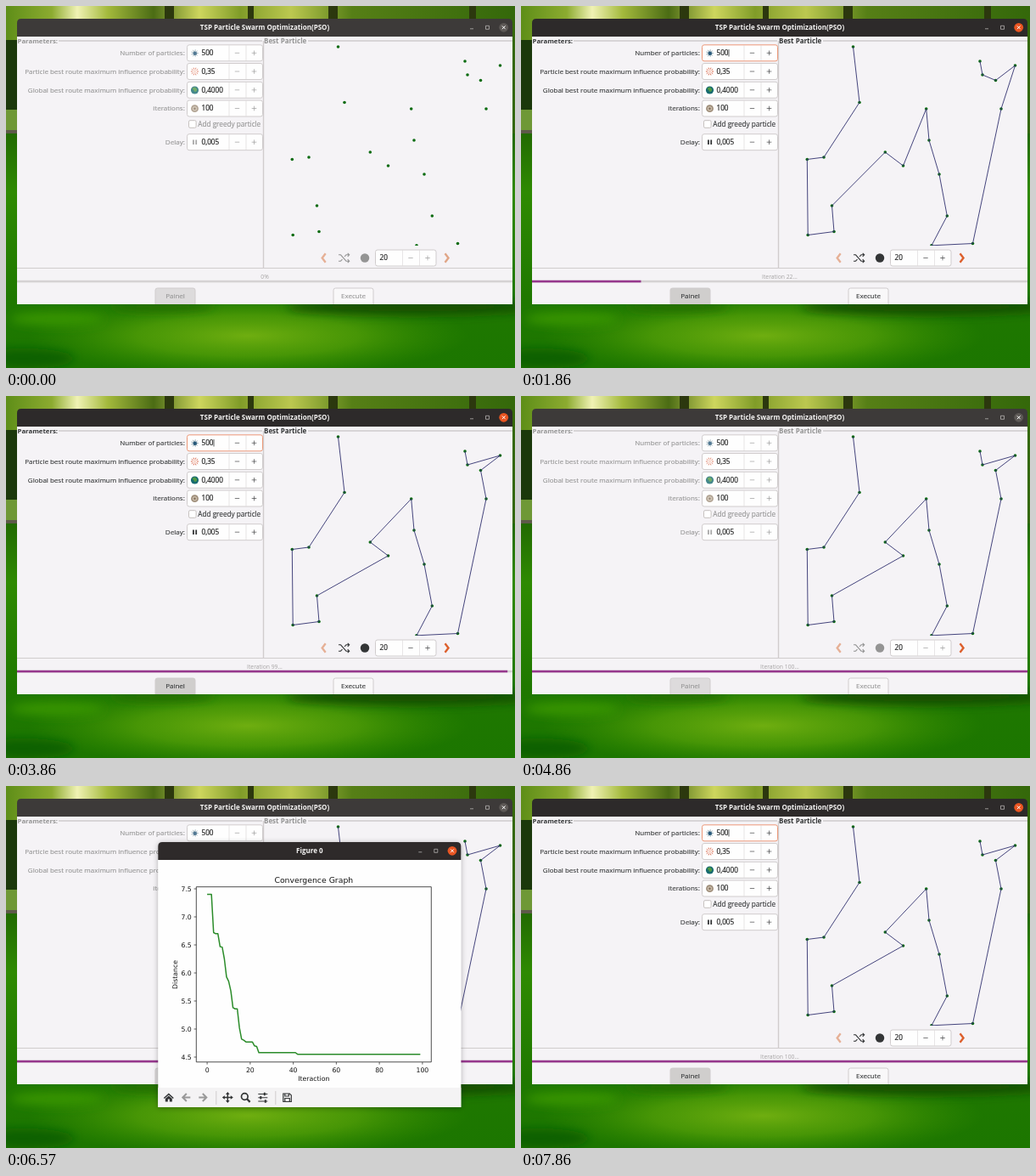
Write an HTML page that moves like this. It is 600x426 px and loops after 8 s.

```html
<!DOCTYPE html>
<html lang="en">
<head>
<meta charset="utf-8">
<title>Particle swarm demo</title>
<style>
  html, body { margin: 0; width: 100%; height: 100%; overflow: hidden; background: #237a00; }
  svg { display: block; width: 100%; height: 100%; }
  text { font: 8px "Open Sans", sans-serif; fill: var(--ink); stroke: var(--ink); stroke-width: .12px; }
  .bold { font-weight: 700; stroke: none; }
  .title { font-weight: 700; fill: #f6f5f4; stroke: none; }
  .value { font-size: 8.2px; fill: #222; stroke: #222; stroke-width: .2px; }
  .status { font-size: 6.8px; fill: #a5a3a3; stroke: none; }
  .plot text { font: 7.75px "DejaVu Sans", sans-serif; fill: #151515; stroke: none; }
  .plot .heading { font-size: 9.3px; }
  .right { text-anchor: end; }
  .mid { text-anchor: middle; }
  .line { fill: none; stroke: var(--ink); }
  .edge { fill: none; stroke: #d0cccd; }
  .window { --ink: #333536; --bar: #2d2a2a; --close: #e95420; --pressed: #d0cecd; --focus: #ec9878; }
  .window.blurred { --ink: #949494; --bar: #3d3a39; --close: #5d5956; --pressed: #dddbdc; --focus: #d0cccd; }
  .blurred .caret { display: none; }
  .blurred .icons { opacity: .8; }
</style>
</head>
<body>
<svg viewBox="0 0 600 426" preserveAspectRatio="none">
  <defs>
    <linearGradient id="treeline">
      <stop offset="0" stop-color="#5e8e18"/><stop offset=".09" stop-color="#8cab30"/>
      <stop offset=".14" stop-color="#f0f2b4"/><stop offset=".2" stop-color="#a3b93c"/>
      <stop offset=".29" stop-color="#4b6c14"/><stop offset=".38" stop-color="#ced65e"/>
      <stop offset=".46" stop-color="#809c28"/><stop offset=".56" stop-color="#bcc850"/>
      <stop offset=".68" stop-color="#567f16"/><stop offset="1" stop-color="#34680a"/>
    </linearGradient>
    <linearGradient id="lawn" x2="0" y2="1">
      <stop offset="0" stop-color="#226a02"/><stop offset=".25" stop-color="#2f8a02"/>
      <stop offset=".7" stop-color="#1f7800"/><stop offset="1" stop-color="#1c7600"/>
    </linearGradient>
    <radialGradient id="sunlight">
      <stop offset="0" stop-color="#6fae10"/><stop offset=".5" stop-color="#55a008" stop-opacity=".75"/>
      <stop offset="1" stop-color="#3a9000" stop-opacity="0"/>
    </radialGradient>
    <filter id="soft" x="-50%" y="-100%" width="200%" height="300%"><feGaussianBlur stdDeviation="6"/></filter>
    <filter id="shadow" x="-10%" y="-10%" width="120%" height="120%">
      <feDropShadow dx="0" dy="1" stdDeviation="3" flood-opacity=".3"/>
    </filter>
    <clipPath id="canvasArea"><path d="M304 42H597V282H304z"/></clipPath>
  </defs>

  <g id="park">
    <path fill="url(#treeline)" d="M0 0H600V150H0z"/>
    <path fill="#2c380e" d="M187 0h11v20h-11zM285 0h7v20h-7zM380 0h11v20h-11zM546 0h8v20h-8z"/>
    <path fill="#1b380b" d="M0 40H14V122H0z"/>
    <path fill="#6f9836" d="M0 122H14V146H0z"/>
    <path fill="#5e5a4a" d="M0 146H14V150H0z"/>
    <path fill="url(#lawn)" d="M0 150H600V426H0z"/>
    <ellipse cx="285" cy="388" rx="260" ry="48" fill="url(#sunlight)"/>
    <g filter="url(#soft)">
      <ellipse cx="480" cy="354" rx="150" ry="9" fill="#124c00"/>
      <ellipse cx="185" cy="353" rx="60" ry="6" fill="#216a00"/>
      <ellipse cx="60" cy="368" rx="55" ry="8" fill="#389400"/>
      <ellipse cx="20" cy="415" rx="60" ry="12" fill="#116000"/>
    </g>
  </g>
  <g id="app" class="window"></g>
  <g id="figure" class="window" filter="url(#shadow)"></g>
</svg>

<script>
const $ = id => document.getElementById(id);
const label = (x, y, s, cls = '', extra = '') => `<text x="${x}" y="${y}" class="${cls}" ${extra}>${s}</text>`;
const path = (d, cls = 'line', extra = '') => `<path d="${d}" class="${cls}" ${extra}/>`;
const box = (x, y, w, h, fill, extra = '') => `<rect x="${x}" y="${y}" width="${w}" height="${h}" fill="${fill}" ${extra}/>`;
const dot = (x, y, r, fill) => `<circle cx="${x}" cy="${y}" r="${r}" fill="${fill}"/>`;
const range = (n, f) => Array.from({ length: n }, (_, i) => f(i));

function titleBar(x, y, w, title) {
  const right = x + w, cy = y + 10.3;
  return path(`M${x} ${y + 21}v-16q0-5 5-5h${w - 10}q5 0 5 5v16z`, '', 'style="fill:var(--bar)"') +
    label(x + w / 2, y + 13.4, title, 'title mid') +
    path(`M${right - 50} ${cy + 1.5}h4M${right - 31.5} ${cy - 2}h4v4h-4z`, '', 'fill="none" stroke="#c8c5c3" stroke-width=".7"') +
    dot(right - 10.3, cy, 5.4, 'var(--close)') +
    path(`M${right - 12.2} ${cy - 1.9}l3.8 3.8m0-3.8l-3.8 3.8`, '', 'stroke="#fff" stroke-width="1"');
}

function spinner(x, y, w, value, textX, border = '#d0cccd') {
  const minus = x + w - 30, plus = x + w - 10;
  return box(x, y - 9.5, w, 19, '#fefefe', `rx="2.5" style="stroke:${border}"`) +
    path(`M${minus - 9.5} ${y - 9}v18M${plus - 9.5} ${y - 9}v18`, 'edge', 'stroke-opacity=".5"') +
    path(`M${minus - 2.7} ${y}h5.4M${plus - 2.8} ${y}h5.6M${plus} ${y - 2.8}v5.6`, 'line', 'stroke-width=".8" stroke-opacity=".8"') +
    label(textX, y + 2.9, value, 'value');
}

const rays = (x, y, n, r1, r2) => range(n, i => {
  const a = i * 2 * Math.PI / n, c = Math.cos(a), s = Math.sin(a);
  return `M${x + c * r1} ${y + s * r1}L${x + c * r2} ${y + s * r2}`;
}).join('');

const icons = [
  path(rays(222.5, 55.5, 9, 1, 4.3), '', 'stroke="#8fa6b0" stroke-width="1"') + dot(222.8, 55.8, 2.2, '#28597a'),
  path(rays(222.5, 77, 10, 2.6, 4.6), '', 'stroke="#d9684c" stroke-width="1"') + dot(222.5, 77, 2, '#f7d8cd'),
  dot(222.5, 99, 4.6, '#176b70') + path('M219.5 97q3-3 5 0t-2 4z', '', 'fill="#4e9a45"'),
  dot(222.5, 120.7, 4.4, '#9d8c78') + dot(222.5, 120.7, 2.8, '#c9bcaa') + dot(222.5, 120.7, 1.2, '#806d59'),
  path('M220.9 157.5v5.4M224.2 157.5v5.4', 'line', 'stroke-width="1.8"')
].join('');

const fields = [
  ['Number of particles:', '500', 55.3],
  ['Particle best route maximum influence probability:', '0,35', 77],
  ['Global best route maximum influence probability:', '0,4000', 98.8],
  ['iterations:', '100', 120.5],
  ['Delay:', '0,005', 160.2]
];

// Cities in the order of the best tour found.
const cities = [[391.5, 48], [399, 113.5], [357, 178], [337.3, 180.5], [338.2, 269.5], [369, 265.5], [366.5, 235],
  [450.5, 188], [429.3, 172], [477.7, 121], [481, 158], [493, 198], [502.3, 247], [484, 281.8], [532.5, 279.5],
  [566, 121], [559.5, 87.5], [582.5, 70], [544, 81], [541, 65]];

// Each entry keeps a stretch of the tour reversed until the given iteration.
const detours = [[42, 16, 18], [24, 7, 9], [15, 10, 15], [12, 3, 6], [10, 5, 12], [8, 9, 17], [6, 1, 9], [3, 4, 14]];

function tourAt(iteration) {
  let tour = cities.slice();
  for (const [until, from, to] of detours) {
    if (iteration < until) tour = [...tour.slice(0, from), ...tour.slice(from, to).reverse(), ...tour.slice(to)];
  }
  return 'M' + tour.join('L');
}

$('app').innerHTML =
  box(13, 30, 584, 321, '#f5f3f6') + titleBar(13, 15, 584, 'TSP Particle Swarm Optimization(PSO)') +
  path('M62 41H302M356 41H597M303.5 41V308', 'edge', 'stroke-width="1.4"') +
  path('M13 308.5H597', 'edge') +
  label(13.5, 43.7, 'Parameters:', 'bold', 'style="font-size:7.8px"') + label(304, 43.7, 'Best Particle', 'bold') +
  fields.map(([name, value, y], i) =>
    label(210.8, y + 2.7, name, 'right') + spinner(213.5, y, 89, value, 230.5, i ? undefined : 'var(--focus)')).join('') +
  `<g class="icons">${icons}</g>` + path('M245 51v8.5', 'line caret', 'stroke-width=".8"') +
  box(215.5, 134.7, 8.6, 8.6, '#fff', 'rx="1.5" stroke="#c6c1bf"') +
  label(226.3, 142, 'Add greedy particle', '', 'style="font-size:8.2px"') +
  `<g clip-path="url(#canvasArea)">${cities.map(([x, y]) => dot(x, y, 1.8, '#0b6b10')).join('')}
    <path id="tour" fill="none" stroke="#30306f" stroke-width=".9"/></g>` +
  path('M376.7 291.3l-4 5.2 4 5.2', '', 'fill="none" stroke="#e6b096" stroke-width="2.4"') +
  path('M517.5 291.3l4 5.2-4 5.2', '', 'id="next" fill="none" stroke-width="2.4"') +
  path('M392 292.8h2.5l6.5 7.4h3.5M392 300.2h2.5l2-2.2M399 295l2-2.2h3.5M402.7 290.8l2 2-2 2M402.7 298.2l2 2-2 2', 'line', 'stroke-width="1.1"') +
  dot(423, 296.5, 5.2, 'var(--ink)') + spinner(435.5, 296.5, 71.5, '20', 440.5) +
  label(305, 321.3, '', 'status mid', 'id="status"') +
  box(13, 322.8, 584, 2.6, '#d5d2d3') + box(13, 322.8, 0, 2.6, '#96378d', 'id="progress"') +
  path('M176 351v-16.5q0-2.5 2.5-2.5h42q2.5 0 2.5 2.5v16.5', 'edge', 'style="fill:var(--pressed)"') +
  path('M386 351v-16.5q0-2.5 2.5-2.5h42q2.5 0 2.5 2.5v16.5', 'edge', 'style="fill:#f9f8f9"') +
  label(199.5, 344, 'Painel', 'mid') + label(409.5, 344, 'Execute', 'mid');

// Convergence chart: iteration and distance at each bend.
const bends = [[0, 7.4], [2, 7.4], [3, 6.72], [4, 6.7], [5, 6.7], [6, 6.47], [7, 6.46], [8, 6.25], [9, 5.93], [10, 5.85],
  [11, 5.68], [12, 5.38], [13, 5.36], [14, 5.36], [15, 5.02], [16, 4.82], [17, 4.8], [18, 4.77], [21, 4.77], [22, 4.7],
  [23, 4.69], [24, 4.58], [41, 4.58], [42, 4.55], [99, 4.55]];
const chartX = i => 57.8 + i * 2.538;
const chartY = d => 55 + (7.5 - d) * 66;
const curve = 'M' + bends.map(([i, d]) => [chartX(i), chartY(d)]).join('L');

const axes = path('M45 52.7H322V258.8H45z', '', 'fill="none" stroke="#222" stroke-width=".8"') +
  range(6, i => {
    const x = chartX(i * 20);
    return path(`M${x} 259v2.7`, '', 'stroke="#222" stroke-width=".7"') + label(x, 270.6, i * 20, 'mid');
  }).join('') +
  range(7, i => {
    const y = chartY(4.5 + i / 2);
    return path(`M45 ${y}h-2.7`, '', 'stroke="#222" stroke-width=".7"') + label(39.5, y + 2.9, (4.5 + i / 2).toFixed(1), 'right');
  }).join('');

const toolbar = box(0, 289, 357, 23, '#f4f3f4') +
  path('M68.5 293v16M138.5 293v16', 'edge') +
  path('M6.5 301l6-5.5 6 5.5-1 1-5-4.5-5 4.5zM8.5 302l4-3.6 4 3.6v3.5h-3v-3h-2v3h-3z', '', 'fill="#303334"') +
  path('M38 300.5h-9m4.5-4.5l-4.5 4.5 4.5 4.5M48 300.5h9m-4.5-4.5l4.5 4.5-4.5 4.5', '', 'fill="none" stroke="#999" stroke-width="2"') +
  path('M77 300.5h10M82 295.5v10', 'line', 'stroke-width="1.5"') +
  path('M82 294l2.3 3h-4.6zM82 307l2.3-3h-4.6zM75.5 300.5l3-2.3v4.6zM88.5 300.5l-3-2.3v4.6z', '', 'fill="#303334"') +
  '<circle cx="102" cy="299.5" r="3.8" class="line" stroke-width="1.7"/>' + path('M104.7 302.3l3.6 3.6', 'line', 'stroke-width="2.2"') +
  path('M118 296.5h11M118 300.7h11M118 305h11', 'line', 'stroke-width="1.1"') +
  path('M125.5 294.8v3.4M121 299v3.4M126.5 303.3v3.4', 'line', 'stroke-width="2"') +
  path('M147.5 296h7.5l2 2v7.5h-9.5zM149.5 296v3h4.5v-3M149.5 305v-3.5h5.5v3.5', 'line', 'stroke-width="1.2"');

$('figure').innerHTML = box(0, 15, 357, 297, '#fefefe') + titleBar(0, 0, 357, 'Figure 0') +
  `<g class="plot">${axes}${path(curve, '', 'fill="none" stroke="#2c8c2a" stroke-width="1.5" stroke-linejoin="round"')}
    ${label(183.5, 48, 'Convergence Graph', 'mid heading')}${label(183.5, 281, 'Iteraction', 'mid')}
    ${label(0, 0, 'Distance', 'mid', 'transform="translate(22.5 156) rotate(-90)"')}</g>` + toolbar;

const clamp = v => Math.max(0, Math.min(1, v));
const smooth = v => v * v * (3 - 2 * v);

function render(time) {
  const tick = Math.floor((time + 5) * 7 / 1000); // seven pictures a second
  const iteration = Math.min(100, Math.max(0, Math.round((tick - 9) * 5.5)));
  const running = iteration > 0;

  $('app').classList.toggle('blurred', tick < 9 || (tick >= 34 && tick < 50));
  $('tour').setAttribute('d', running ? tourAt(iteration) : '');
  $('next').setAttribute('stroke', running ? '#dd602d' : '#e0a687');
  $('status').textContent = running ? `Iteration ${iteration}...` : '0%';
  $('progress').setAttribute('width', 5.84 * iteration);

  const drag = smooth(clamp((tick - 38) / 6));
  $('figure').style.display = tick >= 35 && tick < 50 ? '' : 'none';
  $('figure').setAttribute('transform', `translate(${108.3 + 71 * drag} ${70 - 4 * drag})`);
}

const start = performance.now();
function loop() {
  render((performance.now() - start) % 8000);
  requestAnimationFrame(loop);
}
loop();
</script>
</body>
</html>
```
